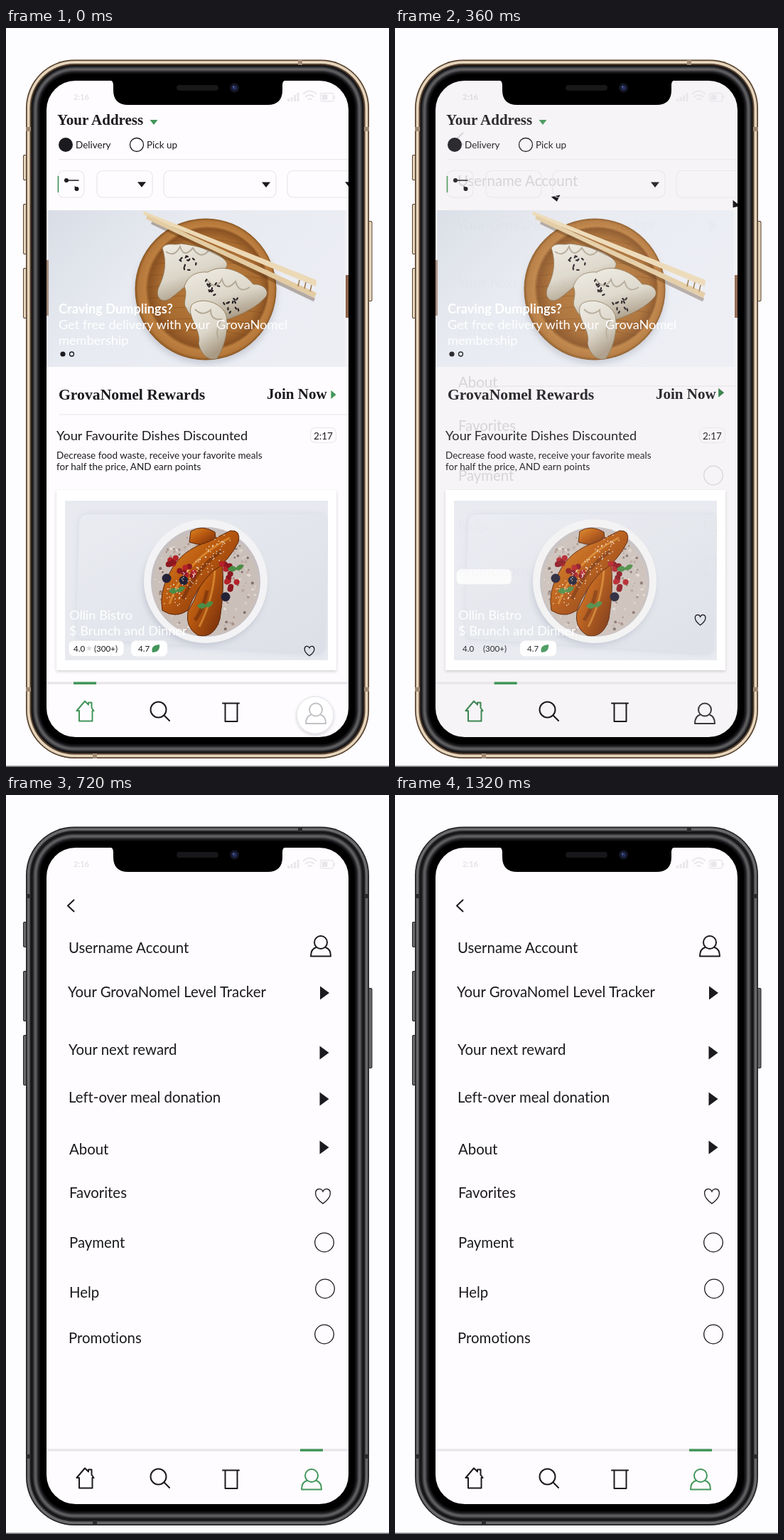
These frames come from a looping animation (539x1038 px, 1.44 s). An HTML page:

```html
<!DOCTYPE html>
<html lang="en">
<head>
<meta charset="utf-8">
<title>Food delivery app: opening the account menu</title>
<style>
html,body{margin:0;width:100%;height:100%;overflow:hidden;background:#fdfcfe}
svg{display:block;width:100%;height:100%;font-family:Lato,"Open Sans",sans-serif;font-variant-ligatures:none;fill:#1b1a1f}
.serif{font-family:"Liberation Serif","Noto Serif",serif;font-weight:700}
.line{fill:none;stroke:#1b1a1f;stroke-width:2;stroke-linejoin:round;stroke-linecap:round}
.thin{fill:none;stroke:#1b1a1f;stroke-width:1.3;vector-effect:non-scaling-stroke}
.edge{fill:none;stroke:#e8e6ea;stroke-width:1.2}
.pale{fill:#e9e7eb}
.menu{font-size:20.4px}
.white{fill:#fff;font-size:18.2px}
.small{font-size:13.5px}
.tiny{font-size:11.6px}
</style>
</head>
<body>
<svg viewBox="0 0 539 1038" preserveAspectRatio="none">
<defs>
  <clipPath id="screenClip"><rect x="57" y="74" width="425" height="922" rx="41"/></clipPath>
  <clipPath id="bannerClip"><rect x="60" y="256" width="417" height="220"/></clipPath>
  <clipPath id="dishClip"><rect x="83" y="664" width="370" height="224"/></clipPath>
  <linearGradient id="wall" x2="1" y2=".5"><stop stop-color="#d9dde6"/><stop offset=".4" stop-color="#e7eaf0"/><stop offset="1" stop-color="#eceef4"/></linearGradient>
  <radialGradient id="wood" fx=".6" fy=".45"><stop stop-color="#c08443"/><stop offset=".7" stop-color="#a86b30"/><stop offset=".84" stop-color="#8a5223"/><stop offset=".88" stop-color="#bd8040"/><stop offset=".96" stop-color="#b4773a"/><stop offset="1" stop-color="#87531f"/></radialGradient>
  <linearGradient id="dough" x2=".4" y2="1"><stop stop-color="#efece4"/><stop offset=".6" stop-color="#dcd6c9"/><stop offset="1" stop-color="#a99a84"/></linearGradient>
  <linearGradient id="board" x2="1" y2="1"><stop stop-color="#eaecf1"/><stop offset="1" stop-color="#dcdfe7"/></linearGradient>
  <linearGradient id="fruit" x2="1" y2="1"><stop stop-color="#e08a22"/><stop offset=".45" stop-color="#b85810"/><stop offset="1" stop-color="#6e2a0b"/></linearGradient>
  <filter id="soft" x="-30%" y="-30%" width="160%" height="160%"><feGaussianBlur stdDeviation="4"/></filter>
  <filter id="drop" x="-20%" y="-20%" width="140%" height="140%"><feDropShadow dx="0" dy="2" stdDeviation="2" flood-opacity=".16"/></filter>
  <path id="user" d="M-6.500 2.500C-11.500 4-14 8.500-14 15H14C14 8.500 11.500 4 6.500 2.500M0-13.500A9 9 0 1 1 0 4.500A9 9 0 1 1 0-13.500Z"/>
</defs>
<rect width="539" height="1038" fill="#fdfcfe"/>
<rect y="1036.3" width="539" height="1.7" fill="#77757a"/>
<g id="body"></g>

<g clip-path="url(#screenClip)">
  <rect id="screen" x="57" y="74" width="425" height="922"/>
  <text x="95" y="101" font-size="11" font-weight="700" opacity=".11">2:16</text>
  <g id="menu"></g>
  <path id="arrowA"/><path id="arrowB"/>

  <g id="home">
    <text class="serif" x="72" y="136" font-size="21">Your Address</text>
    <path d="M202.500 129h11l-5.500 7z" fill="#43965a"/>
    <circle cx="84" cy="164" r="10"/><circle cx="184" cy="164" r="9.500" class="thin"/>
    <text class="small" x="98" y="169">Delivery</text><text class="small" x="198" y="169">Pick up</text>
    <path class="edge" d="M74 184.500H482"/>
    <g id="chips"></g>
    <path d="M73.500 208v23" stroke="#43965a" stroke-width="1.600"/>
    <path class="line" d="M85 214H102M97 223l2 2" style="stroke-width:1.500"/><circle cx="85" cy="214" r="3"/><circle cx="99.500" cy="226" r="3"/>
    <path d="M360 216.500h12l-6 7.500z"/>

    <rect x="57" y="256" width="4" height="220" fill="#e6e6ec"/>
    <rect x="57" y="326" width="3" height="78" fill="#a58c7d"/>
    <rect x="477" y="256" width="5" height="220" fill="#f4f2f6"/>
    <rect x="478" y="347" width="4" height="60" fill="#8a6148"/>
    <g clip-path="url(#bannerClip)">
      <rect x="60" y="256" width="417" height="220" fill="url(#wall)"/>
      <ellipse cx="281" cy="374" rx="100" ry="98" fill="#8b91a1" opacity=".35" filter="url(#soft)"/>
      <circle cx="281" cy="367" r="99.500" fill="url(#wood)"/>
      <g id="grain" fill="none" stroke="#70401a" opacity=".35"></g>
      <g fill="url(#dough)" stroke="#8a7150" stroke-width=".8">
        <path d="M220 309C226 300 236 306 246 303C266 305 301 313 311 330C313 342 297 339 284 346C260 352 246 370 231 380C219 388 209 378 215 364C223 347 227 330 220 309Z"/>
        <path d="M251 363C257 346 270 342 284 343C307 329 336 344 348 360C361 359 371 368 366 377C354 392 331 403 310 410C287 418 260 411 254 394C247 386 257 376 251 363Z"/>
        <path d="M262 388C277 377 304 386 310 404C314 425 307 449 297 464C286 469 274 459 271 443C276 424 252 404 262 388Z"/>
      </g>
      <path d="M225 314q12 9 20-7q5 17 18 2q10 17 22 4M282 352q12 19 22 1q5 19 19 3q5 18 20 8M266 395q10 11 22 1q0 15 15 13q-9 17-4 28" fill="none" stroke="#b4aa98" stroke-width="2"/>
      <g id="sesame" stroke="#262124" stroke-width="2.200" stroke-linecap="round"></g>
      <path d="M205 273L434 382" stroke="#4d2c12" stroke-width="5" opacity=".35"/>
      <path d="M194 257.500L437 354L436 363L193 262Z" fill="#ecd9b6"/>
      <path d="M199 263L437 372L434 379L197 268Z" fill="#e3cba2"/>
      <path d="M413 354l-2 9M422 357l-2 9M430 361l-2 9" stroke="#967345" stroke-width="1.500"/>
    </g>
    <text class="white" x="74" y="401" font-weight="700">Craving Dumplings?</text>
    <text class="white" x="74" y="423" xml:space="preserve">Get free delivery with your  GrovaNomel</text>
    <text class="white" x="74" y="444.500">membership</text>
    <circle cx="80" cy="458" r="3.600"/><circle cx="92.500" cy="458" r="3" class="thin"/>

    <text class="serif" x="74" y="522" font-size="21.700">GrovaNomel Rewards</text>
    <text class="serif" x="367" y="521" font-size="21">Join Now</text>
    <path id="rule" class="edge" d="M75 543H482"/>
    <text x="71" y="578.500" font-size="18.200">Your Favourite Dishes Discounted</text>
    <rect class="edge" x="428.500" y="561.500" width="36" height="21" rx="7"/>
    <text class="small" x="433" y="577.500">2:17</text>
    <text class="small" x="71" y="605">Decrease food waste, receive your favorite meals</text>
    <text class="small" x="71" y="621">for half the price, AND earn points</text>

    <rect x="71" y="649" width="394" height="253" fill="#fff" filter="url(#drop)"/>
    <g clip-path="url(#dishClip)">
      <rect x="83" y="664" width="370" height="224" fill="#e8eaf0"/>
      <path d="M116 683H440Q452 683 452 696L449 868Q448 881 435 881L111 860Q98 859 99 846L103 697Q104 683 116 683Z" fill="#b9bfcc" opacity=".4" filter="url(#soft)"/>
      <path d="M116 683H440Q452 683 452 696L449 866Q448 879 435 879L111 858Q98 857 99 844L103 697Q104 683 116 683Z" fill="url(#board)"/>
      <ellipse cx="279" cy="784" rx="86" ry="83" fill="#959cae" opacity=".4" filter="url(#soft)"/>
      <circle cx="281" cy="777" r="87" fill="#f3f2f4"/>
      <circle cx="281" cy="778" r="77" fill="#c6bfc0"/>
      <circle cx="281" cy="780" r="74" fill="#cbc0b9"/>
      <g id="oats"></g>
      <g fill="url(#fruit)" stroke="#5c240b" stroke-width="1">
        <path d="M260 707Q276 697 294 708L296 724Q277 729 258 722Z"/>
        <path d="M283 744Q297 737 304 749Q308 788 301 830Q293 858 270 853Q252 842 256 820Q275 789 283 744Z"/>
        <path d="M316 706Q331 705 327 722Q312 751 290 764Q268 786 256 818Q238 830 220 818Q215 793 230 766Q246 733 284 722Z"/>
      </g>
      <path d="M315 716Q280 734 258 760Q238 783 230 809M294 762Q291 804 272 841" fill="none" stroke="#f5b048" stroke-width="3" opacity=".5"/>
      <path d="M303 735Q270 756 249 802M283 790Q278 815 266 832" fill="none" stroke="#5a200a" stroke-width="5" opacity=".45"/>
      <g id="berries"></g>
      <g id="seeds" fill="#eee7dd"></g>
    </g>
    <text class="white" x="89" y="831">Ollin Bistro</text>
    <text class="white" x="89" y="852.500">$ Brunch and Dinner</text>
    <rect id="pill" width="78" height="22" rx="7" fill="#fff" stroke="#ebe9ed"/>
    <text class="tiny" x="95" y="875.500">4.0</text><text class="tiny" x="124" y="875.500">(300+)</text>
    <path id="star" d="M117 867l1.200 2.800 3 .2-2.300 2 .8 3-2.700-1.600-2.700 1.600.8-3-2.300-2 3-.2z" fill="#dddbe0"/>
    <rect x="176" y="860.500" width="51" height="22" rx="7" fill="#fff"/>
    <text class="tiny" x="186" y="875.500">4.7</text>
    <path d="M206 877Q203 867 216 866Q217 877 206 877Z" fill="#43965a"/>
  </g>

  <path id="arrowC"/>
  <path id="heart" class="thin" d="M0 6.500C-5 3-6.500 0-6.500-2.500C-6.500-7-1.500-7.500 0-4C1.500-7.500 6.500-7 6.500-2.500C6.500 0 5 3 0 6.500Z"/>
  <rect x="57" y="918.500" width="425" height="3.200" fill="#e8e6e9"/>
  <rect id="bar" y="918.500" width="32" height="3.500" fill="#43965a"/>
  <path id="homeIcon" class="line" d="M103 973.500V959H99.500L111 945.500L116 950.500V947.500H120.500V955L123.500 959H121.500V973.500Z"/>
  <g class="line"><circle cx="214.500" cy="957.500" r="11"/><path d="M222.500 965.500L230 973M305 948.500H328M308.500 948.500V974H325.500V948.500"/></g>
  <g id="press"><circle cx="435" cy="965" r="26" fill="#fff" filter="url(#drop)" stroke="#dfdde2"/></g>
  <use id="tabUser" href="#user" class="line"/>
  <use id="topUser" href="#user" class="line" x="443" y="211.500"/>
  <g class="pale">
    <path d="M396 99h3v4h-3zM400.500 97h3v6h-3zM405 94h3v9h-3zM409.500 91h3v12h-3z"/>
    <path d="M418 93Q427.500 84 437 93M421 97Q427.500 91 434 97M424.500 100.500Q427.500 98 430.500 100.500" fill="none" stroke="#e9e7eb" stroke-width="2"/>
    <rect x="442.500" y="91.500" width="18" height="11.500" rx="2.500" fill="none" stroke="#e9e7eb" stroke-width="1.300"/>
    <rect x="444.500" y="93.500" width="8" height="7.500" rx="1"/><rect x="461.500" y="95" width="1.600" height="4.500"/>
  </g>
</g>
<path d="M143 73C149 73 151 75 151 81V87C151 101 158 108 172 108H368C382 108 389 101 389 87V81C389 75 391 73 397 73Z" fill="#000"/>
<rect x="240" y="80" width="59" height="8" rx="4" fill="#17171a"/>
<circle cx="321.500" cy="84" r="6.500" fill="#151727"/><circle cx="321.500" cy="84" r="3" fill="#263263"/><circle cx="320" cy="82.500" r="1" fill="#6a78b5"/>
</svg>
<script>
const STEP = 120, LOOP = 1440;
// progress of the dissolve, one value per step
const PROGRESS = [0, .004, .028, .14, .373, 1];
const GREEN = [67, 150, 90], INK = [27, 26, 31], WHITE = [254, 252, 254], DIM = [194, 192, 194];

const $ = id => document.getElementById(id);
const mix = (a, b, p) => a + (b - a) * p;
const blend = (a, b, p) => `rgb(${a.map((v, i) => Math.round(mix(v, b[i], p)))})`;
const set = (id, attrs) => { for (const k in attrs) $(id).setAttribute(k, attrs[k]); };

let seed = 7;
const rnd = () => (seed = (seed * 16807) % 2147483647) / 2147483647;
const repeat = (n, make) => Array.from({ length: n }, (_, i) => make(i)).join('');
// random point inside a disc
const spot = (x, y, r) => {
  const a = rnd() * 2 * Math.PI, d = Math.sqrt(rnd()) * r;
  return [x + d * Math.cos(a), y + d * Math.sin(a)].map(v => +v.toFixed(1));
};
const dot = ([x, y], r, fill) => `<circle cx="${x}" cy="${y}" r="${r}"${fill ? ` fill="${fill}"` : ''}/>`;

function buildBody() {
  const box = (x, y, w, h, r, fill) => `<rect x="${x}" y="${y}" width="${w}" height="${h}" rx="${r}" style="fill:${fill}"/>`;
  const shell = (d, fill) => box(28 + d, 44.5 + d, 483 - 2 * d, 981.5 - 2 * d, 68 - d, fill);
  const button = (x, y, h) => box(x, y, 7, h, 2, 'var(--edge)') + box(x + 1, y + 1, 5, h - 2, 1.5, 'var(--rim)');
  const buttons = button(24, 178, 36) + button(24, 247, 71) + button(24, 337, 71) + button(508.5, 271, 113);
  const rim = shell(0, 'var(--edge)') + shell(1.7, 'var(--rim)') + shell(5.5, 'var(--edge)');
  // dark side wall with a soft grey highlight
  const wall = repeat(14, i => {
    const d = 7.5 + i, v = Math.round(12 + 85 * Math.exp(-(((d - 13) / 3.2) ** 2)));
    return shell(d, `rgb(${v},${v},${v + 3})`);
  });
  const seams = [[28, 139, 7, 6], [504, 139, 7, 6], [28, 926, 7, 6], [504, 926, 7, 6], [411, 45, 6, 7], [122, 1019, 6, 7]];
  $('body').innerHTML = buttons + rim + wall + shell(20, '#000') +
    seams.map(s => box(...s, 0, 'var(--seam)')).join('');
}

function buildMenu() {
  const rows = [['Username Account', 88, 222], ['Your GrovaNomel Level Tracker', 87, 283.5],
    ['Your next reward', 88, 364.5], ['Left-over meal donation', 88, 431.5], ['About', 89, 504.5],
    ['Favorites', 89, 566], ['Payment', 89, 635.5], ['Help', 89, 705.5], ['Promotions', 88, 769.5]];
  $('menu').innerHTML =
    rows.map(([s, x, y]) => `<text class="menu" x="${x}" y="${y}">${s}</text>`).join('') +
    '<path class="line" d="M95.500 147.500L87 155.500L95.500 163.500"/><path d="M442 268.500L455 278L442 287.500Z"/>' +
    [[448, 628.5], [449, 693.5], [448, 757.5]].map(([x, y]) => `<circle class="thin" cx="${x}" cy="${y}" r="13.300"/>`).join('');
}

function buildFood() {
  $('chips').innerHTML = [[73, 37], [128, 78], [222, 158], [396, 100]]
    .map(([x, w]) => `<rect class="edge" x="${x}" y="200.500" width="${w}" height="37.500" rx="8"/>`).join('');
  $('grain').innerHTML = repeat(9, i => {
    const y = 300 + i * 16, h = Math.sqrt(7000 - (y - 367) ** 2);
    return `<path d="M${282 - h} ${y}Q282 ${y - 10} ${282 + h} ${y + 4}"/>`;
  });
  $('sesame').innerHTML = [[256, 330, 12], [293, 360, 15], [316, 389, 12]].map(c => repeat(11, () => {
    const [x, y] = spot(...c), a = rnd() * 6;
    return `<path d="M${x} ${y}l${2.5 * Math.cos(a)} ${2.5 * Math.sin(a)}"/>`;
  })).join('');
  const tones = ['#e6dcd5', '#a99288', '#bba9a2', '#d8cdc6', '#85706b'];
  $('oats').innerHTML = repeat(260, i => dot(spot(281, 779, 72), (.7 + rnd() * 1.6).toFixed(1), tones[i % 5]));
  const berries = [[253, 767, 12], [322, 778, 13], [235, 751, 8], [309, 755, 6]]
    .map(c => repeat(7, i => dot(spot(...c), 4, i % 2 ? '#b52229' : '#8b1720'))).join('');
  const blue = [[309, 799], [250, 776], [226, 773]].map(c => dot(c, 6.5, '#242237')).join('');
  const mint = [[240, 789], [280, 810], [323, 758]].map(([x, y]) =>
    `<path d="M${x - 11} ${y + 2}q6-8 12-2q5-7 11-3q-5 9-11 6q-6 6-12-1z" fill="#4c8d46"/>`).join('');
  $('berries').innerHTML = berries + blue + mint;
  $('seeds').innerHTML = repeat(110, i => {
    const u = rnd();
    return dot(spot(mix(308, 230, u), mix(722, 805, u), 15), .8);
  });
}

// Triangle turned by deg around (x, y); it points right at 0
function arrow(id, from, to, p) {
  const [x, y, a, b, deg] = from.map((v, i) => mix(v, to[i], p));
  set(id, { d: `M${-a} ${-b}L${a} 0L${-a} ${b}Z`, transform: `translate(${x} ${y}) rotate(${deg})` });
}

function draw(now) {
  const step = Math.floor((now % LOOP) / STEP);
  const p = PROGRESS[Math.min(step, 5)], open = step > 5;
  const style = $('body').style;
  style.setProperty('--rim', open ? '#69686a' : '#e6d5bd');
  style.setProperty('--edge', open ? '#232224' : '#58422f');
  style.setProperty('--seam', open ? '#2b2a2c' : '#a08974');

  set('screen', { fill: blend(WHITE, DIM, open ? 0 : p) });
  set('menu', { opacity: p });
  set('home', { opacity: 1 - p ** 1.3 });
  set('pill', { x: mix(88, 75, p), y: mix(860.5, 141, p), opacity: 1 - p });
  set('star', { opacity: step ? 0 : 1 });
  set('rule', { transform: `translate(${mix(0, 260, p)} ${mix(0, -285, p)})` });

  arrow('arrowA', [191, 220, 3.7, 6, 90], [448, 362, 6.5, 9.5, 0], p);
  arrow('arrowB', [483, 220, 3.7, 6, 90], [448, 427, 6.5, 9.5, 360], p);
  arrow('arrowC', [461, 515, 3.6, 6, 0], [448, 495, 6.5, 9.5, 0], p);
  set('arrowC', { fill: blend(GREEN, INK, p) });
  set('heart', { transform: `translate(${mix(427, 446, p)} ${mix(875, 563.5, p)}) scale(${mix(1.05, 1.6, p)})` });

  set('bar', { x: mix(95, 414, p) });
  $('homeIcon').style.stroke = blend(GREEN, INK, p);
  set('press', { opacity: step ? 0 : 1 });
  set('tabUser', { x: open ? 430 : 436, y: open ? 960.5 : 962, opacity: open ? 1 : 1 - p });
  $('tabUser').style.stroke = open ? '#43965a' : step ? '#1b1a1f' : '#c3c1c6';
  set('topUser', { opacity: open ? 1 : 0 });
}

buildBody();
buildMenu();
buildFood();
const start = performance.now();
function tick() {
  draw(performance.now() - start);
  requestAnimationFrame(tick);
}
tick();
</script>
</body>
</html>
```
